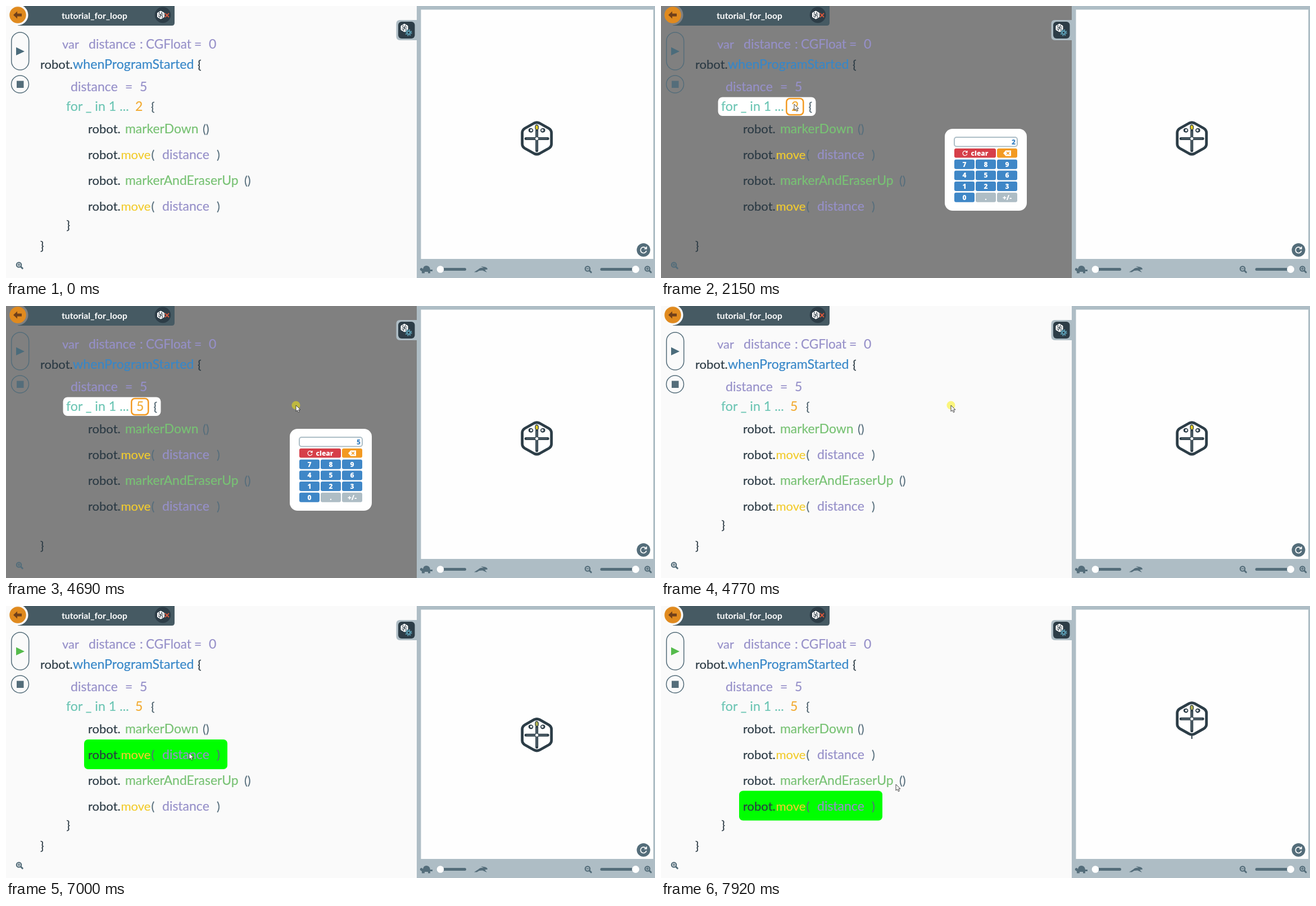
Recreate the animation shown at these times as an HTML page. Size 1155 by 485 pixels, loop 8 s.

```html
<!DOCTYPE html>
<html lang="en">
<head>
<meta charset="utf-8">
<title>tutorial_for_loop</title>
<style>
  html, body { margin: 0; width: 100%; height: 100%; overflow: hidden; }
  svg { display: block; width: 100%; height: 100%; }
  text { font-family: Lato, sans-serif; white-space: pre; }
  #code text { stroke-width: .2px; }
  #pad text { font: 800 12px "Open Sans", sans-serif; fill: #fff; text-anchor: middle; }
  #pad #display { fill: #3f87c7; text-anchor: end; }
  .slate { fill: #546d7a; }
  .line { fill: none; stroke: #546d7a; stroke-linecap: round; }
</style>
</head>
<body>
<svg viewBox="0 0 1155 485" preserveAspectRatio="none">
  <defs>
    <g id="die">
      <path d="M0-7 6-3.5V3.5L0 7-6 3.5V-3.5Z" fill="#fff" stroke="#fff" stroke-linejoin="round"/>
      <path d="M-4-2 4 2M2-5-2 5" stroke="#2d3d47" stroke-width="1.3"/>
      <g fill="#2d3d47"><circle cx="-2.5" cy="-4" r="1"/><circle cx="3.5" cy="-1.5" r="1"/><circle cx="-3.5" cy="2" r="1"/><circle cx="2.500" cy="3.8" r="1"/></g>
    </g>
    <g id="lens" class="line">
      <circle r="4.2" stroke-width="2.2"/>
      <path d="M3.5 3.5 6.3 6.3" stroke-width="3"/>
      <path d="M-1.8 0H1.8" stroke-width="1.5"/>
    </g>
    <path id="reload" d="M4.6-2.6A5.3 5.3 0 1 0 5.2 1.5M5.3-6V-2H1.4" fill="none" stroke="#fff" stroke-width="1.7"/>
  </defs>

  <rect id="paper" width="731" height="485"/>

  <!-- header and run controls -->
  <path d="M21 0H300V30Q300 35 295 35H21Z" fill="#465a63"/>
  <circle id="ring" cx="21" cy="16" r="18.5"/>
  <circle cx="21" cy="16" r="14.8" fill="#e08a1e"/>
  <path d="M13 16 20 9.5V13.5H28V18.5H20V22.5Z" fill="#70401a"/>
  <text x="99" y="23" font-size="15.7" font-weight="700" fill="#fff">tutorial_for_loop</text>
  <circle cx="279" cy="16" r="14.3" fill="#2d3d47"/>
  <use href="#die" x="275.5" y="16"/>
  <path d="M283 13 290 20M290 13 283 20" stroke="#d9583b" stroke-width="1.8"/>
  <g class="line" stroke-width="1.5">
    <rect x="9.7" y="47" width="31" height="67" rx="15.5"/>
    <circle cx="25" cy="139.5" r="15.5"/>
  </g>
  <path id="play" d="M18 73.5 33 81 18 88Z"/>
  <rect class="slate" x="19" y="133.5" width="12.5" height="12.5"/>
  <use href="#lens" x="23" y="461.5"/>
  <path class="line" d="M23 459.7V463.3" stroke-width="1.5"/>

  <g fill="#0f0">
    <rect id="firstMove" x="139" y="238" width="255" height="53" rx="7"/>
    <rect id="secondMove" x="139" y="329.5" width="255" height="53" rx="7"/>
  </g>
  <g id="editRow">
    <rect x="101.5" y="162.5" width="174" height="33.5" rx="8" fill="#fff"/>
    <rect x="223.3" y="165" width="30" height="29" rx="6" fill="#fff" stroke="#f39a22" stroke-width="2.5"/>
  </g>
  <g id="code"></g>

  <g id="pad">
    <rect x="505" y="219" width="146" height="146" rx="14" fill="#fff"/>
    <rect x="522" y="234" width="112" height="16.5" rx="4" fill="#fff" stroke="#adbec7" stroke-width="2"/>
    <text id="display" x="631" y="246.5"></text>
    <rect x="522" y="254" width="74" height="16.5" rx="3" fill="#d63f49"/>
    <use href="#reload" transform="translate(541 262.5) scale(.75)"/>
    <text x="567" y="266.5">clear</text>
    <rect x="598" y="254" width="36" height="16.5" rx="3" fill="#f39a22"/>
    <path d="M609 262.5 613.5 257.5H623V267.5H613.5Z" fill="#fff"/>
    <path d="M615 260 620 265M620 260 615 265" stroke="#f39a22" stroke-width="1.5"/>
  </g>

  <!-- stage panel -->
  <rect x="731" width="424" height="485" fill="#aebdc5"/>
  <rect x="738.5" y="6.5" width="413.5" height="444.5" fill="#fefefe"/>
  <path d="M731 25H701Q694.5 25 694.5 32V54Q694.5 61 701 61H731Z" fill="#aebdc5"/>
  <rect x="698" y="28" width="29.5" height="30" rx="6" fill="#2d3d47"/>
  <use href="#die" x="709" y="39"/>
  <circle cx="716.5" cy="47.5" r="4.8" fill="none" stroke="#5c9fb5" stroke-width="2.5" stroke-dasharray="1.885"/>
  <circle cx="716.5" cy="47.5" r="2.7" fill="none" stroke="#5c9fb5" stroke-width="2"/>
  <circle class="slate" cx="1134.5" cy="435" r="12"/>
  <use href="#reload" x="1134.5" y="435"/>

  <path class="slate" d="M737 471Q736 467 740 467L742 469Q743 463 748 463Q754 463 755 470L759 470V473H755V476.5H751V474H745V476.5H740V473Z"/>
  <path class="slate" d="M833 474.5 840 470Q844 465.500 850 467L845 464 853 465.500Q857 467 857 469.500L852 470.500 856 475 848 471.500 842 472 838 474.500Z"/>
  <g class="line" stroke-width="5"><path d="M773 469.5H816.500M1060 469.5H1120"/></g>
  <circle cx="773" cy="469.5" r="6.3" fill="#fff"/>
  <circle cx="1120.5" cy="469.5" r="6.5" fill="#fff"/>
  <use href="#lens" x="1035" y="468.5"/>
  <use href="#lens" x="1141.5" y="468.5"/>
  <path class="line" d="M1141.5 466.7V470.3" stroke-width="1.5"/>

  <path id="trail" stroke="#2c3d47" stroke-width="2"/>
  <g id="robot" stroke="#2c3d47">
    <path d="M-5-27Q0-29.5 5-27L21-18Q26-15 26-10V10Q26 15 21 18L5 27Q0 29.5-5 27L-21 18Q-26 15-26 10V-10Q-26-15-21-18Z" fill="#fff" stroke-width="4.8"/>
    <path d="M-19.500.5H19.5M0-14V22" stroke-width="5" stroke-linecap="round"/>
    <path d="M-18.500.5H18.5M0-13V21" stroke="#5c6c76" stroke-width="1.6"/>
    <ellipse id="marker" cy="-19.5" rx="2.8" ry="4.5" stroke-width="1.3"/>
    <g fill="#2c3d47" stroke="none">
      <path d="M-15-15Q-14-19-9-18Q-5-16-7-12Q-9-9-13-11Q-15-12-15-15Z"/>
      <path d="M15-15Q14-19 9-18Q5-16 7-12Q9-9 13-11Q15-12 15-15Z"/>
    </g>
    <g fill="#fff" stroke="none">
      <circle cx="-10" cy="-14.5" r="1.9"/>
      <circle cx="10" cy="-14.5" r="1.9"/>
      <circle cy=".5" r="2.5"/>
    </g>
  </g>

  <g id="pointer">
    <circle id="halo" r="7.5" fill="#fcf000" opacity=".5"/>
    <path d="M0 0V11L2.5 8.7 4.4 12.7 6.3 11.9 4.5 8H8Z" fill="#fff" stroke="#333" stroke-width=".9"/>
  </g>
</svg>
<script>
const LOOP = 8000;
const $ = id => document.getElementById(id);

function add(parent, tag, attrs, content = '') {
  const node = document.createElementNS('http://www.w3.org/2000/svg', tag);
  for (const key in attrs) node.setAttribute(key, attrs[key]);
  node.textContent = content;
  return parent.appendChild(node);
}

const dark = '#2b3a44', purple = '#9690c9', green = '#78c274', yellow = '#f2cc2e', grey = '#566e7c';

function write(content, x, y, color, size = 23) {
  return add($('code'), 'text', { x, y, fill: color, stroke: color, 'font-size': size }, content);
}

write('var', 100, 76, purple, 22);
write('distance', 147, 76, purple);
write(':', 238, 76, purple);
write('CGFloat', 249, 76, purple, 22.5);
write('=', 335, 76, purple);
write('0', 361, 76, purple);
write('robot.', 61, 111.5, dark, 22);
write('whenProgramStarted', 119, 111.5, '#3787c8', 23.2);
write('{', 341, 111.5, dark, 22);
write('distance', 115, 151.5, purple);
write('=', 212, 151.5, purple);
write('5', 238, 151.5, purple);
write('for _ in 1 ...', 107, 187, '#6cc5b4', 23.2);
const count = write('2', 230, 187, '#f2ab33');
const forOpen = write('{', 258, 187, '#485d69', 22);
for (const y of [273, 364.5]) {
  write('robot.', 146, y, dark, 22);
  write('move', 204.5, y, yellow, 22);
  write('(', 258.5, y, grey, 22);
  write('distance', 278, y, purple);
  write(')', 375, y, grey, 22);
}
for (const [name, y, x] of [['markerDown', 227, 350], ['markerAndEraserUp', 319, 424]]) {
  write('robot.', 146, y, dark, 22);
  write(name, 212, y, green, 22.9);
  write('()', x, y, grey, 22);
}
const forClose = write('}', 107.5, 397.5, dark, 22);
write('}', 61, 434.5, dark, 22);

['7', '8', '9', '4', '5', '6', '1', '2', '3', '0', '.', '+/-'].forEach((label, i) => {
  const x = 522 + i % 3 * 38, y = 273.7 + Math.floor(i / 3) * 19.7;
  add($('pad'), 'rect', { x, y, width: 36, height: 17, rx: 3, fill: i < 10 ? '#3f87c7' : '#aebdc5' });
  add($('pad'), 'text', { x: x + 18, y: y + 12.8 }, label);
});

// Pointer path: time, x, y and the ease-out power used to get there
const path = [
  [300, 1090, 474, 1], [1070, 305, 220, 2], [1530, 237, 175, 2],
  [2180, 237, 175, 1], [2920, 584, 270, 1.5], [3150, 579.5, 302, 1.5],
  [4160, 579.5, 302, 1], [4610, 516, 177, 2],
  [5000, 516, 177, 1], [5240, 400, 194, 1], [5840, 98, 103, 1.3], [6230, 24, 80, 2],
  [6690, 24, 80, 1], [7500, 418, 318, 3]
];
const clicks = [[1530, 1760], [3150, 3390], [4610, 4840], [6230, 6460]];

const clamp = v => Math.min(1, Math.max(0, v));
const within = (t, from, to = LOOP) => t >= from && t < to;
const show = (id, on) => $(id).setAttribute('visibility', on ? 'visible' : 'hidden');
const smooth = (t, start, length) => {
  const u = clamp((t - start) / length);
  return u * u * (3 - 2 * u);
};

function pointerAt(t) {
  const next = path.findIndex(key => key[0] > t);
  if (next < 1) return path[next < 0 ? path.length - 1 : 0].slice(1, 3);
  const [t0, x0, y0] = path[next - 1], [t1, x1, y1, power] = path[next];
  const u = 1 - (1 - (t - t0) / (t1 - t0)) ** power;
  return [x0 + (x1 - x0) * u, y0 + (y1 - y0) * u];
}

function render(t) {
  const editing = within(t, 2150, 4770), running = t >= 6460;
  const paper = editing ? '#808080' : '#fafafa';
  $('paper').setAttribute('fill', paper);
  $('ring').setAttribute('fill', paper);
  show('editRow', editing);
  show('pad', editing);
  count.textContent = $('display').textContent = t < 3620 ? '2' : '5';
  count.setAttribute('x', editing ? 232 : 230);
  forOpen.setAttribute('x', editing ? 262.5 : 258);
  forClose.setAttribute('visibility', editing ? 'hidden' : 'visible');

  $('play').setAttribute('fill', running ? '#55bb4c' : '#4b6c7b');
  show('firstMove', within(t, 6610, 7480));
  show('secondMove', t >= 7480);

  const drawn = 22 * smooth(t, 6740, 740);
  const y = 236 - drawn - 22 * smooth(t, 7480, 780);
  $('robot').setAttribute('transform', `translate(944.7 ${y})`);
  $('marker').setAttribute('fill', t < 6610 ? '#e8cf24' : '#b5b552');
  $('trail').setAttribute('d', `M944.7 237V${236 - drawn}`);
  show('trail', drawn > 0);

  const [px, py] = pointerAt(t);
  $('pointer').setAttribute('transform', `translate(${px} ${py})`);
  show('pointer', t >= 300);
  show('halo', clicks.some(([from, to]) => within(t, from, to)));
}

const began = performance.now();
function tick() {
  render((performance.now() - began) % LOOP);
  requestAnimationFrame(tick);
}
tick();
</script>
</body>
</html>
```
